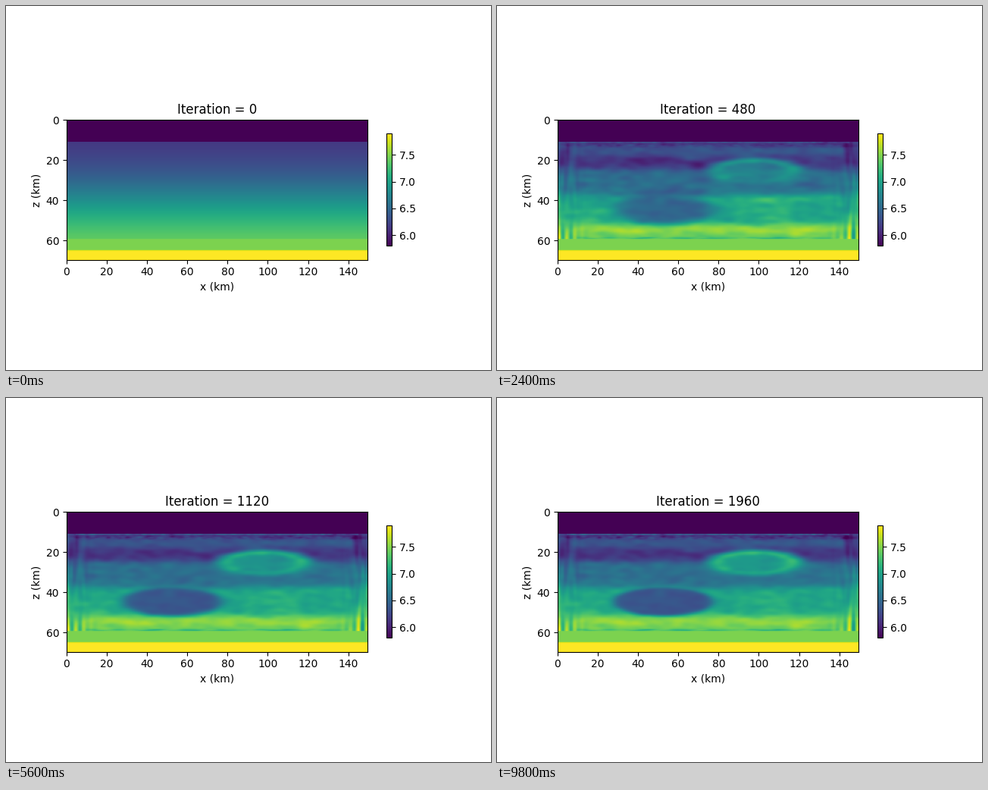
Write a matplotlib script that moves like this. It is 640 px wide and 480 px high and loops after 10000 ms.

```python
import numpy as np
import matplotlib.pyplot as plt
from matplotlib.animation import FuncAnimation

FRAMES, INTERVAL, STEP = 50, 200, 40
NX, NZ, D = 300, 140, 0.5
VMIN, VMAX = 5.8, 7.895
X, Z = np.meshgrid(np.arange(NX) * D, np.arange(NZ) * D)
EDGE = np.minimum(X, X.max() - X)


def noise(seed, sx, sz):
    """Unit-variance Gaussian-filtered noise with correlation lengths in km."""
    raw = np.random.default_rng(seed).normal(size=(NZ, NX))
    kx = np.fft.fftfreq(NX, D)[None, :]
    kz = np.fft.fftfreq(NZ, D)[:, None]
    low = np.exp(-2 * np.pi ** 2 * ((kx * sx) ** 2 + (kz * sz) ** 2))
    out = np.fft.ifft2(np.fft.fft2(raw) * low).real
    return out / out.std()


def rise(v, at, width):
    """Smooth step from 0 to 1 around a position."""
    return 1 / (1 + np.exp(np.clip((at - v) / width, -50, 50)))


def bump(v, at, width):
    return np.exp(-((v - at) / width) ** 2)


def radius(cx, cz, a, b):
    return np.hypot((X - cx) / a, (Z - cz) / b)


def grow(iteration, rate):
    return 1 - np.exp(-iteration / rate)


def mix(a, b, t):
    return a + (b - a) * t


START = 6.06 + 1.52 * rise(Z, 39.5, 10.5)
RIPPLE = 0.13 * np.cos(2 * np.pi * (Z - 15) / 12) * rise(Z, 25, -0.8)
LAYERS = (6.23 + 0.34 * rise(Z, 25.3, 0.7) + 0.48 * rise(Z, 37.3, 0.9)
          + 0.4 * rise(Z, 51, 0.9) + RIPPLE)
SLOW = radius(52.3, 44.6, 24.8, 7.0)
FAST = radius(98.3, 25.2, 24.4, 6.7)
RIM = bump(FAST, 0.76, 0.17)

# Vertical fringes near both sides, brightest at depth
SIDE = bump(EDGE, 0, 8)
FRINGE = SIDE * (0.13 * noise(11, 0.75, 4.5)
                 + 0.4 * np.cos(2 * np.pi * (EDGE - 4.3) / 4) * bump(Z, 59, 7))
FRINGE -= 0.2 * bump(EDGE, 4, 1.6) * bump(Z, 16, 5)

# Early artefacts that fade away: x, z, half width, strength
GHOSTS = sum(amp * bump(X, x, w) * bump(Z, z, 2.5) for x, z, w, amp in [
    (42, 20, 14, -0.25), (70, 22.5, 6, -0.4), (52, 36.5, 20, -0.4),
    (73, 29, 5, -0.35), (125, 32, 7, -0.3), (105, 39, 24, 0.4),
    (24, 46, 7, 0.3)])

COARSE = noise(3, 4.5, 1.3)
FINE = noise(7, 2.3, 0.9)
DASH = noise(21, 0.9, 0.3)
TOP_ROWS = (bump(Z, 11, 0.3) * (EDGE > 4) * (0.3 + 0.12 * DASH)
            + bump(Z, 12.5, 1) * (0.08 * DASH - 0.15))
BOTTOM_ROWS = -bump(Z, 58.8, 0.5) * (EDGE > 9) * (0.15 + 0.1 * noise(22, 2.2, 0.3))


def model(iteration):
    first = grow(iteration, 110)
    middle = grow(iteration, 280)
    late = grow(iteration, 550)
    fade = first * np.exp(-iteration / 450)
    grain = 0.08 * fade * COARSE + 0.04 * first * FINE

    out = mix(START, LAYERS, first * (0.45 + 0.55 * middle)) + grain
    out += first * (0.09 + 0.1 * (1 - late)) * bump(Z, 54.5, 2.2)
    out = mix(out, 6.34 + 0.5 * grain, middle * rise(SLOW, 1, -0.22 + 0.17 * late))
    out = mix(out, 6.92 + grain, late * rise(FAST, 1, -0.07))
    upper = rise(Z, 25, -0.9)
    out += RIM * (0.27 * first * upper + 0.2 * late ** 2 * (1 - upper))
    out = mix(out, START, 0.55 * SIDE)
    out += GHOSTS * fade * 1.4 + FRINGE * first
    out += late * TOP_ROWS + middle * BOTTOM_ROWS

    out[Z < 11] = VMIN
    out[Z > 59] = 7.48
    out[Z > 64.5] = 7.8
    out[Z > 65] = VMAX
    return out


fig, ax = plt.subplots(figsize=(6.4, 4.8), dpi=100)
image = ax.imshow(model(0), extent=[0, X.max(), Z.max(), 0],
                  vmin=VMIN, vmax=VMAX, cmap="viridis")
fig.colorbar(image, shrink=0.4)
ax.set_xlabel("x (km)")
ax.set_ylabel("z (km)")
title = ax.set_title("Iteration = 0")


def draw(i):
    image.set_data(model(i * STEP))
    title.set_text(f"Iteration = {i * STEP}")
    return image, title


anim = FuncAnimation(fig, draw, frames=FRAMES, interval=INTERVAL,
                     repeat=True, repeat_delay=0)
plt.show()
```
